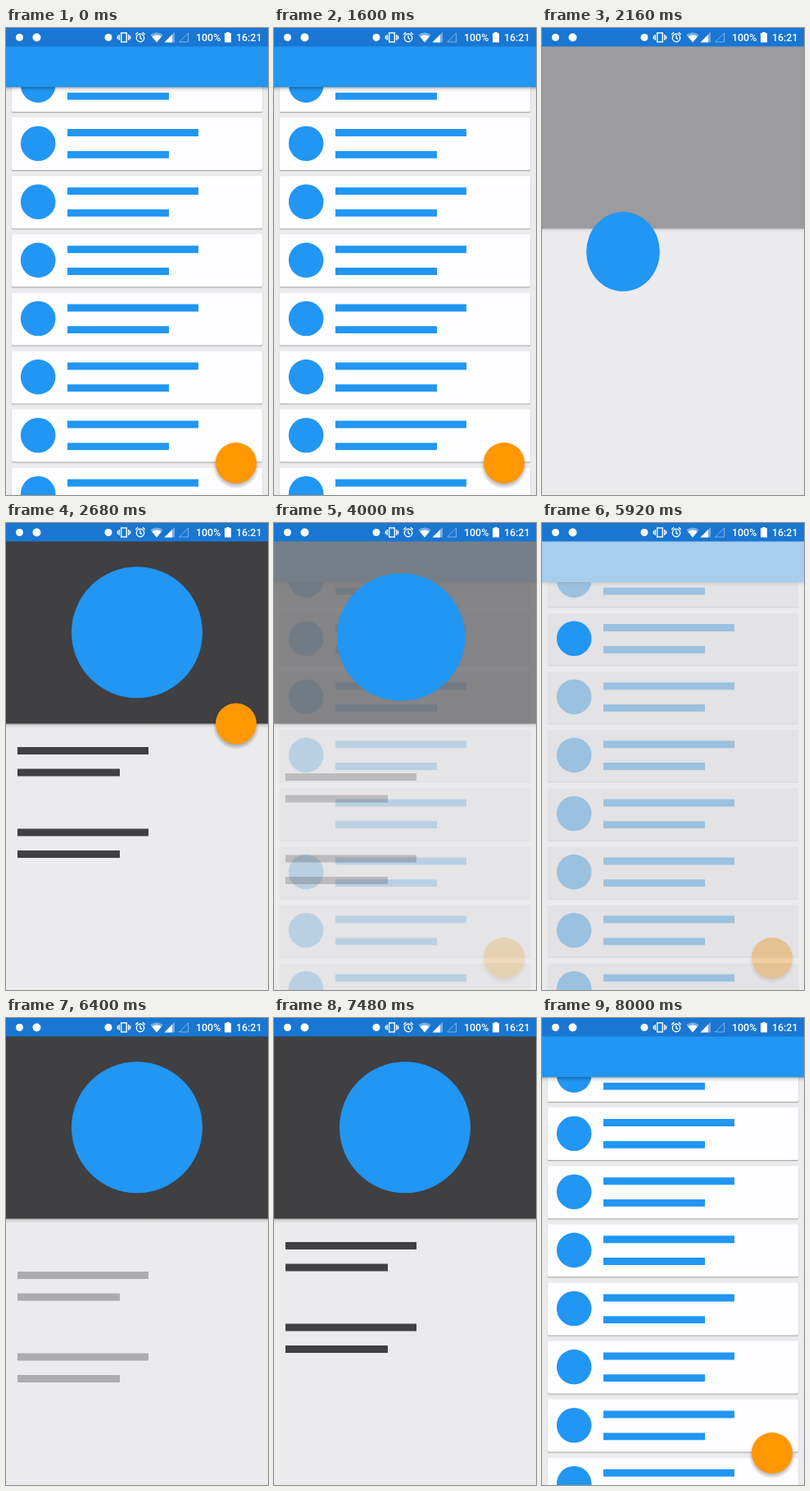
An HTML page that plays this animation: 320 px wide and 569 px high, repeating every 8.04 s.

```html
<!DOCTYPE html>
<html lang="en">
<head>
<meta charset="utf-8">
<title>List to detail transition</title>
<style>
  html, body { margin: 0; width: 100%; height: 100%; overflow: hidden; background: #ebeaec; }
  svg { display: block; width: 100vw; height: 100vh; }
  text { font: 500 12.4px Roboto, sans-serif; fill: #fff; }
</style>
</head>
<body>
<svg viewBox="0 0 320 569" preserveAspectRatio="none">
  <defs>
    <linearGradient id="drop" x2="0" y2="1">
      <stop offset="0" stop-opacity=".32"/>
      <stop offset=".4" stop-opacity=".1"/>
      <stop offset="1" stop-opacity="0"/>
    </linearGradient>
    <radialGradient id="halo">
      <stop offset=".76" stop-opacity=".3"/>
      <stop offset="1" stop-opacity="0"/>
    </radialGradient>
    <clipPath id="below"><path d="M0 72H320V569H0z"/></clipPath>
    <g id="fab">
      <circle cy="3" r="28.5" fill="url(#halo)"/>
      <circle r="25" fill="#ff9800"/>
    </g>
  </defs>

  <rect width="320" height="569" fill="#ebeaec"/>
  <g id="shadows" clip-path="url(#below)"></g>
  <g id="list">
    <g id="cards"></g>
    <rect y="72" width="320" height="6" fill="url(#drop)"/>
    <rect y="22" width="320" height="50" fill="#2196f3"/>
    <use href="#fab" x="281" y="530"/>
  </g>

  <g id="panel">
    <rect y="244" width="320" height="6" fill="url(#drop)"/>
    <rect y="22" width="320" height="222.5" fill="#403f41"/>
  </g>
  <path id="lines" fill="#403f41" d="M14 273h160v9H14zM14 299.5h125v9H14zM14 372.5h160v9H14zM14 399h125v9H14z"/>
  <ellipse id="hero" fill="#2196f3"/>
  <use id="action" href="#fab"/>

  <rect width="320" height="22.5" fill="#1976d2"/>
  <g fill="#fff">
    <circle cx="16.5" cy="11.5" r="4.5"/>
    <circle cx="37.5" cy="11.5" r="5"/>
    <circle cx="125" cy="11.5" r="4.5"/>
    <path fill-opacity=".4" d="M184 17.6L176.3 8.2Q184 2.6 191.7 8.2z"/>
    <path d="M184 17.6L178.2 10.5Q184 6.5 189.8 10.5z"/>
    <path fill-opacity=".4" d="M206 5V17.5H193.5z"/>
    <path d="M203 8V17.5H193.5z"/>
    <path d="M267 6.2h2.2V5h3.6v1.2h2.2V17.5h-8z"/>
  </g>
  <g fill="none" stroke="#fff" stroke-width="1.4">
    <rect x="140.7" y="6" width="6.6" height="11"/>
    <path d="M138.3 8v7M136.4 9.5v4M149.7 8v7M151.6 9.5v4"/>
    <circle cx="164" cy="12" r="4.7"/>
    <path d="M164 9v3.3l2.2 1.4M158.2 8l3-2.6M169.8 8l-3-2.6"/>
    <path stroke-width="1" stroke-opacity=".45" d="M222.5 6.2V17H211.7z"/>
  </g>
  <text x="232" y="16">100%</text>
  <text x="281" y="16">16:21</text>
</svg>

<script>
const LOOP = 8040, STEP = 40;
const PITCH = 71.1, FIRST = 38;
const VISITS = [
  { open: 1480, close: 3800, row: 4 },
  { open: 5520, close: 7480, row: 1 }
];
// left, right, top and bottom edges of the large circle
const BIG = [80, 240, 53.3, 213.3];
// how far each edge runs ahead of or behind the eased progress
const BEND = [.75, .25, -.06, -.28];

const el = id => document.getElementById(id);
const set = (node, attrs) => {
  for (const k in attrs) node.setAttribute(k, attrs[k]);
};
const ramp = (t, from, to) => Math.min(1, Math.max(0, (t - from) / (to - from)));
const decel = p => 1 - (1 - p) ** 2;

// cubic-bezier(.4, 0, .2, 1)
function standard(p) {
  let lo = 0, hi = 1, s = .5;
  for (let i = 0; i < 24; i++) {
    s = (lo + hi) / 2;
    const x = 1.2 * s * (1 - s) ** 2 + .6 * s * s * (1 - s) + s ** 3;
    if (x < p) lo = s; else hi = s;
  }
  return s * s * (3 - 2 * s);
}

let shadows = '', cards = '';
for (let i = 0; i < 8; i++) {
  const y = FIRST + i * PITCH;
  shadows += `<rect x="6.4" y="${y}" width="307.2" height="66" rx="2" fill-opacity=".07"/>
    <rect x="7" y="${y + .8}" width="306" height="64.2" rx="1.5" fill-opacity=".2"/>`;
  cards += `<rect x="7" y="${y}" width="306" height="64" rx="1.5" fill="#fefdff"/>
    <g fill="#2196f3"><circle class="dot" cx="39.2" cy="${y + 31.6}" r="21.3"/>
    <path d="M75 ${y + 14}h160v9H75zM75 ${y + 40.8}h124v8.8H75z"/></g>`;
}
el('shadows').innerHTML = shadows;
el('cards').innerHTML = cards;
const dots = document.querySelectorAll('.dot');

function pose(t) {
  const visit = VISITS.find(v => t >= v.open && t < v.close + 560);
  if (!visit) return { list: 1, panel: 0, move: 0, lines: 0, shift: 0, fab: 0, row: -1 };
  const row = visit.row;
  if (t < visit.close) {
    const u = t - visit.open, rise = decel(ramp(u, 810, 1150));
    return {
      row,
      list: 1 - ramp(u, 160, 515),
      panel: ramp(u, 580, 800),
      move: standard(ramp(u, 586, 886)),
      lines: rise,
      shift: 57 * (1 - rise),
      fab: decel(ramp(u, 900, 1180))
    };
  }
  const u = t - visit.close, fall = ramp(u, 0, 267);
  return {
    row,
    list: ramp(u, 140, 450),
    panel: 1 - ramp(u, 80, 365),
    move: 1 - standard(ramp(u, 168, 468)),
    lines: 1 - fall,
    shift: 57 * fall * fall,
    fab: 0
  };
}

function heroEdges(row, move) {
  const cy = FIRST + row * PITCH + 31.6;
  const small = [17.9, 60.5, cy - 21.3, cy + 21.3];
  return small.map((a, i) => {
    // the lead is counted from the list end in both directions
    const p = move + BEND[i] * move * (1 - move) * (i < 2 || move < 1 ? 1 : 0);
    return a + (BIG[i] - a) * p;
  });
}

function closingEdges(row, move) {
  const cy = FIRST + row * PITCH + 31.6, back = 1 - move;
  const small = [17.9, 60.5, cy - 21.3, cy + 21.3];
  return BIG.map((a, i) => a + (small[i] - a) * (back + BEND[i] * back * move));
}

function draw(t) {
  const p = pose(t), away = p.row >= 0;
  set(el('list'), { opacity: p.list });
  set(el('shadows'), { opacity: p.list });
  set(el('panel'), { opacity: p.panel });
  set(el('lines'), { opacity: p.lines, transform: `translate(0 ${p.shift})` });
  set(el('action'), {
    transform: `translate(281 244.5) scale(${p.fab})`,
    visibility: p.fab > 0 ? 'visible' : 'hidden'
  });
  dots.forEach((d, i) => set(d, { visibility: i === p.row ? 'hidden' : 'visible' }));
  set(el('hero'), { visibility: away ? 'visible' : 'hidden' });
  if (!away) return;
  const closing = VISITS.some(v => v.row === p.row && t >= v.close);
  const [l, r, top, bottom] = (closing ? closingEdges : heroEdges)(p.row, p.move);
  set(el('hero'), {
    cx: (l + r) / 2, cy: (top + bottom) / 2,
    rx: (r - l) / 2, ry: (bottom - top) / 2
  });
}

const start = performance.now();
function tick() {
  const t = (performance.now() - start) % LOOP;
  draw(Math.floor(t / STEP) * STEP);
  requestAnimationFrame(tick);
}
draw(0);
tick();
</script>
</body>
</html>
```
